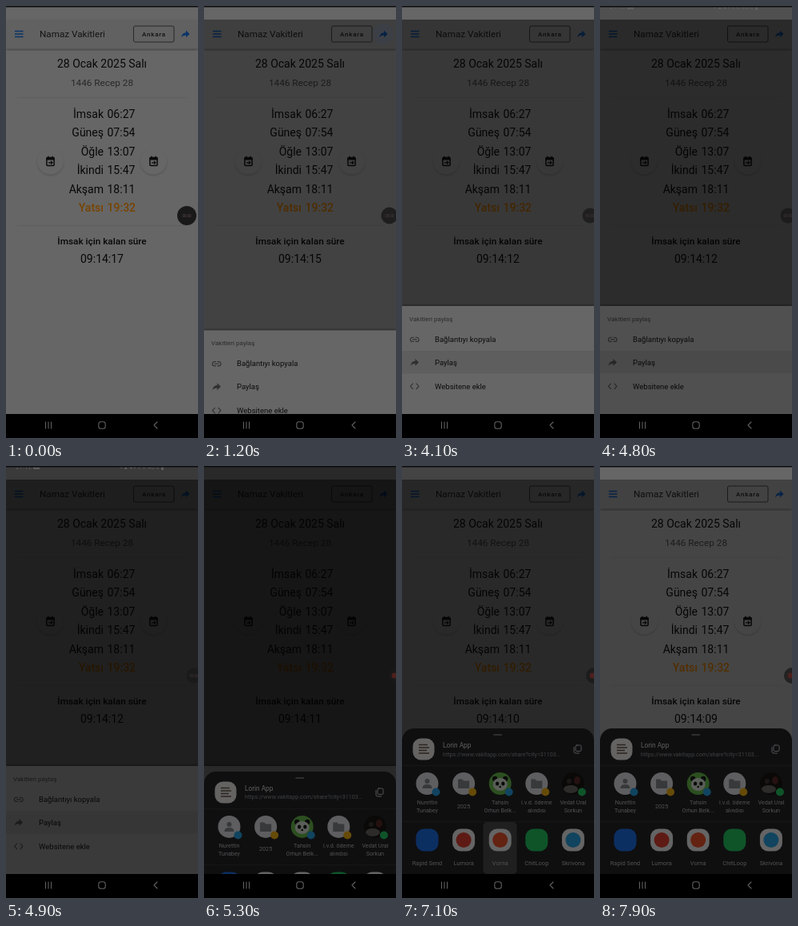
These frames come from a looping animation (240x540 px, 8 s). An HTML page:

```html
<!DOCTYPE html>
<html lang="tr">
<head>
<meta charset="utf-8">
<title>Namaz Vakitleri</title>
<style>
html, body { margin: 0; width: 100%; height: 100%; overflow: hidden; background: #000; }
svg { display: block; width: 100%; height: 100%; font-family: Roboto, sans-serif; }
.mid { text-anchor: middle; }
.end { text-anchor: end; }
.line { fill: none; stroke-linecap: round; stroke-linejoin: round; }
</style>
</head>
<body>
<svg viewBox="0 0 240 540" xmlns="http://www.w3.org/2000/svg">
  <defs>
    <filter id="soft" x="-30%" y="-30%" width="160%" height="160%"><feGaussianBlur stdDeviation="1.6"/></filter>
    <clipPath id="face"><circle r="14"/></clipPath>
    <clipPath id="screen"><rect width="240" height="510"/></clipPath>
    <clipPath id="row"><rect y="431" width="240" height="28.5"/></clipPath>
    <g id="arrow"><path d="M-5 4.5C-4.500 .5-2.500-1.500 1-1.800V-4.500L5.500 0L1 4.300V1.600C-1.800 1.600-3.600 2.500-5 4.500Z"/></g>
    <g id="day">
      <circle cy="1.500" r="16" fill="#000" opacity=".22" filter="url(#soft)"/>
      <circle r="16.500" fill="#666"/>
      <rect x="-4.600" y="-4.500" width="9.200" height="10" rx="1" fill="none" stroke="#0b0b0b" stroke-width="1.500"/>
      <path d="M-5-4.500H5V-1.500H-5ZM-3.500-6.300h1.500v2h-1.500ZM2-6.300h1.500v2H2Z" fill="#0b0b0b"/>
      <path d="M-2.500 1.800H2.500M.5 0L2.500 1.800L.5 3.600" fill="none" stroke="#0b0b0b" stroke-width="1.200"/>
    </g>
    <g id="folder">
      <circle r="14" fill="#5e5e60"/>
      <path d="M-7-5.500H-2L0-3.500H7V6H-7Z" fill="#38393b"/>
    </g>
  </defs>

  <g clip-path="url(#screen)">
    <rect width="240" height="510" fill="#666"/>
    <rect y="52" width="240" height="3" fill="#000" opacity=".35" filter="url(#soft)"/>
    <rect y="17" width="240" height="36.500" fill="#616161"/>
    <circle id="tap" cx="224" cy="35" r="13" fill="#56657c"/>
    <path d="M11 31.500H21.500M11 35H21.500M11 38.500H21.500" stroke="#0a3468" stroke-width="1.300"/>
    <text x="42" y="39" font-size="11.700" fill="#141414">Namaz Vakitleri</text>
    <rect x="159.500" y="25" width="50.500" height="20" rx="2" fill="none" stroke="#222" stroke-width=".9"/>
    <text x="170" y="38" font-size="8" font-weight="500" letter-spacing=".8" fill="#111">Ankara</text>
    <use href="#arrow" x="224" y="35" fill="#0a3468"/>
    <text class="mid" x="120" y="77" font-size="14" fill="#080808">28 Ocak 2025 Salı</text>
    <text class="mid" x="120" y="100" font-size="11.800" fill="#292929">1446 Recep 28</text>
    <path d="M14 114.500H226M14 274.500H226" stroke="#5c5c5c" stroke-width=".8"/>
    <g id="times" font-size="14"></g>
    <use href="#day" x="55.500" y="194"/>
    <use href="#day" x="184.500" y="194"/>
    <text class="mid" x="120" y="297.500" font-size="11.800" font-weight="500" fill="#080808">İmsak için kalan süre</text>
    <text id="count" class="mid" x="120" y="321.300" font-size="14" fill="#080808"></text>

    <rect id="appScrim" y="17" width="240" height="493"/>
    <g id="menu">
      <rect y="374" width="240" height="4" opacity=".4" filter="url(#soft)"/>
      <rect y="375" width="240" height="135" fill="#666"/>
      <g clip-path="url(#row)"><circle id="ripple" cx="104" cy="445" fill="#000" opacity=".08"/></g>
      <text x="9" y="394" font-size="8.100" fill="#2b2b2b">Vakitleri paylaş</text>
      <g font-size="9.500" fill="#0c0c0c">
        <text x="41" y="420">Bağlantıyı kopyala</text>
        <text x="41" y="448.500">Paylaş</text>
        <text x="41" y="478.500">Websitene ekle</text>
      </g>
      <g class="line" stroke="#303030" stroke-width="1.100">
        <path d="M14.500 414.300H13a2.600 2.600 0 0 0 0 5.200h1.500M17 414.300h1.500a2.600 2.600 0 0 1 0 5.200H17M13.500 416.900h4.500"/>
        <path d="M13.500 472L10.500 475.300L13.500 478.600M18 472L21 475.300L18 478.600"/>
      </g>
      <use href="#arrow" x="15.500" y="445.500" fill="#303030"/>
    </g>
    <rect id="sysScrim" width="240" height="510"/>
    <g id="status" font-size="8" fill="#666">
      <text x="12" y="4">21:12 ▬</text>
      <text x="143" y="4">▪ ▴ ◂ ▪ ıl ıl 46% ▮</text>
    </g>
    <rect width="240" height="1.500" fill="#0c0c0c"/>

    <g id="bubble">
      <circle id="disc" fill="#1a1919"/>
      <text id="clock" class="mid" y="1.600" font-size="4.500" fill="#574848">00:00</text>
      <circle id="rec" cx="-2" r="3.500" fill="#4d201e"/>
    </g>

    <g id="share">
      <rect y="328" width="240" height="200" rx="15" fill="#0f0f10"/>
      <path d="M115 336H124.500" class="line" stroke="#3a3a3c" stroke-width="1.500"/>
      <rect x="13.500" y="340.500" width="27" height="27" rx="10" fill="#646362"/>
      <path d="M21 348.500H32M21 352H34M21 355.500H31M21 359H34" stroke="#2b2520" stroke-width="1.500"/>
      <text x="51" y="352" font-size="8.300" fill="#606062">Lorin App</text>
      <text x="51" y="362.500" font-size="7.100" fill="#3f4042">https://www.vakitapp.com/share?city=31103...</text>
      <g class="line" stroke="#555557">
        <rect x="217" y="349" width="7" height="7.500" rx="1.500"/>
        <path d="M215 351.500V357q0 2 2 2h4.500"/>
      </g>
      <path d="M0 374.500H240M0 444.500H240" stroke="#19191b" stroke-width=".8"/>
      <rect id="press" x="101.500" y="445" width="42" height="65" rx="5" fill="#1f1f20"/>
      <g id="people" font-size="7.200" fill="#525254"></g>
      <g id="apps" font-size="7.500" fill="#525254"></g>
    </g>
  </g>

  <rect y="510" width="240" height="30"/>
  <g class="line" stroke="#606060" stroke-width="1.100">
    <path d="M49.500 520V528M53 520V528M56.500 520V528M189 520L185 524L189 528"/>
    <rect x="115.800" y="519.800" width="8.400" height="8.400" rx="2.800"/>
  </g>
</svg>

<script>
const $ = id => document.getElementById(id);
const LOOP = 8000;

const clamp = v => Math.max(0, Math.min(1, v));
const ramp = (t, from, to) => clamp((t - from) / (to - from));
const easeOut = p => 1 - (1 - p) ** 3;
const mix = (a, b, p) => a + (b - a) * p;
const fade = (id, v) => $(id).setAttribute('opacity', v);
const shift = (id, x, y) => $(id).setAttribute('transform', `translate(${x} ${y})`);

const prayers = [['İmsak', '06:27'], ['Güneş', '07:54'], ['Öğle', '13:07'],
  ['İkindi', '15:47'], ['Akşam', '18:11'], ['Yatsı', '19:32']];
$('times').innerHTML = prayers.map(([name, time], i) => {
  const y = 139.6 + i * 23.5;
  const look = i === 5 ? 'fill="#784400" font-weight="500"' : 'fill="#080808"';
  return `<g ${look}><text class="end" x="122" y="${y}">${name}</text><text x="126.5" y="${y}">${time}</text></g>`;
}).join('');

const WHITE = '#646464', BLUE = '#11445f', GREEN = '#0f5429', YELLOW = '#664b08';
const column = i => 31.5 + i * 45.6;
const label = (y, text) => `<text class="mid" y="${y}">${text}</text>`;

const person = `<circle r="14" fill="#5e5e60"/><circle cy="-3" r="3" fill="#38393b"/>
  <path d="M-6 6Q-6 1 0 1T6 6Z" fill="#38393b"/>`;
const panda = `<circle r="14" fill="#2c4f20"/>
  <g fill="#0a0a0a"><circle cx="-6.500" cy="-6" r="3.200"/><circle cx="6.500" cy="-6" r="3.200"/></g>
  <ellipse cy="1" rx="9" ry="8" fill="#5a5e58"/>
  <g fill="#0a0a0a"><ellipse cx="-3.600" rx="2.200" ry="2.600"/><ellipse cx="3.600" rx="2.200" ry="2.600"/><circle cy="4" r="1.300"/></g>`;
const photo = `<g clip-path="url(#face)"><circle r="14" fill="#0a0908"/>
  <ellipse cx="-3" cy="7" rx="9" ry="5" fill="#2d2b2a"/><ellipse cx="5" cy="-4" rx="4" ry="5" fill="#241110"/>
  <circle cx="-5" cy="-3" r="3" fill="#1a1716"/></g>`;
const folder = '<use href="#folder"/>';
const people = [
  [person, BLUE, 'Nurettin', 'Tunabey'],
  [folder, YELLOW, '2025', ''],
  [panda, BLUE, 'Tahsin', 'Orhun Belk...'],
  [folder, YELLOW, 'i.v.d. ödeme', 'alındısı'],
  [photo, GREEN, 'Vedat Ural', 'Sorkun'],
];
$('people').innerHTML = people.map(([face, badge, first, second], i) =>
  `<g transform="translate(${column(i)} 397)">${face}<circle cx="11" cy="10.500" r="5" fill="${badge}"/>
  ${label(second ? 26.3 : 30.5, first)}${label(36, second)}</g>`).join('');

const tile = color => `<rect x="-14" y="-14" width="28" height="28" rx="10" fill="${color}"/>`;
const dot = color => `${tile(WHITE)}<circle r="9.500" fill="${color}"/>`;
const apps = [
  [tile('#0c2f62'), 'Rapid Send'],
  [dot('#5e1b15'), 'Lumora'],
  [dot('#642211'), 'Vorna'],
  [tile(GREEN), 'ChitLoop'],
  [dot(BLUE), 'Skrivona'],
];
$('apps').innerHTML = apps.map(([icon, name], i) =>
  `<g transform="translate(${column(i)} 467.500)">${icon}${label(31, name)}</g>`).join('');

const ticks = [100, 800, 1800, 2700, 3700, 5000, 5900, 7200];

function draw(t) {
  const left = 17 - ticks.filter(at => t >= at).length;
  $('count').textContent = '09:14:' + String(left).padStart(2, '0');

  const open = easeOut(ramp(t, 1000, 1500));
  const close = ramp(t, 6750, 7550);
  fade('appScrim', open * mix(0.45, 0.32, close));
  shift('menu', 0, 142 * (1 - open + easeOut(close)));
  $('menu').style.display = t < 1000 || close === 1 ? 'none' : '';
  fade('tap', 0.4 * ramp(t, 950, 1200) * (1 - ramp(t, 2700, 3200)));
  $('ripple').setAttribute('r', 150 * easeOut(ramp(t, 3350, 3900)));

  fade('sysScrim', 0.6 * ramp(t, 4700, 4980) * (1 - close));
  fade('status', t >= 4800 && t < 5200 ? 0.8 : 0);

  const rise = easeOut(ramp(t, 5150, 5600));
  shift('share', 0, 184 * (1 - rise));
  fade('press', ramp(t, 6750, 6900) * (1 - ramp(t, 7250, 7600)));

  const dock = easeOut(ramp(t, 1000, 1700));
  const recording = t >= 5200;
  shift('bubble', recording ? 240 : mix(226, 235, dock), 262);
  $('disc').setAttribute('r', recording ? 10 : mix(12, 9.5, dock));
  fade('disc', mix(1, 0.8, dock));
  fade('clock', recording ? 0 : mix(1, 0.6, dock));
  fade('rec', recording ? 1 : 0);
}

const start = performance.now();
function tick() {
  draw((performance.now() - start) % LOOP);
  requestAnimationFrame(tick);
}
tick();
</script>
</body>
</html>
```
